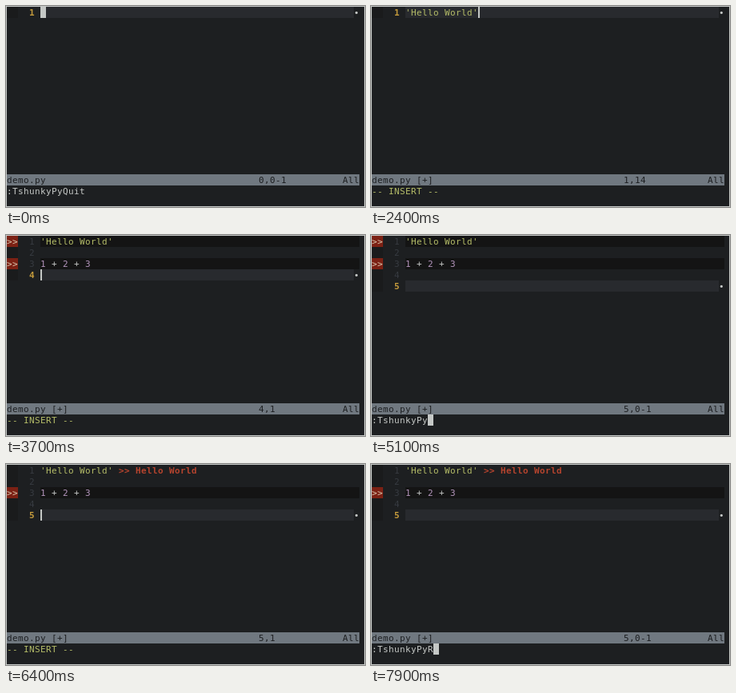
An HTML page with a canvas for the animation above (8000 ms loop, 449 by 252 pixels).

```html
<!DOCTYPE html>
<html lang="en">
<head>
<meta charset="utf-8">
<title>Editor session</title>
<style>
  html, body { margin: 0; width: 100%; height: 100%; overflow: hidden; background: #1d1f21; }
  canvas { display: block; }
</style>
</head>
<body>
<canvas id="screen" width="449" height="252"></canvas>
<script>
const ctx = document.getElementById('screen').getContext('2d');

const LOOP = 8000;
const CELL_W = 7, CELL_H = 14, ORIGIN = 1, BASELINE = 11;
const COLS = 63, TEXT_COL = 6, STATUS_ROW = 15, CMD_ROW = 16;
const FONT = '11px "DejaVu Sans Mono", monospace';

const C = {
  bg: '#1d1f21', fg: '#c5c8c6', border: '#c5c8c6', sign: '#1a1b1c',
  cursorLine: '#282a2e', stale: '#141414', status: '#707880',
  lineNr: '#373b41', currentNr: '#c39a3c', string: '#b5bd68',
  number: '#b294bb', result: '#b5442e', errorBg: '#7c2114', errorFg: '#dcc9b0'
};

const HELLO = "'Hello World'";
const FIRST = HELLO + '\n\n';
const SECOND = '1 + 2 + 3\n\n';
const COMMAND = ':TshunkyPyRunFirstStalled';

const colX = col => ORIGIN + col * CELL_W;
const rowY = row => ORIGIN + row * CELL_H;

function fill(col, row, cols, color) {
  ctx.fillStyle = color;
  ctx.fillRect(colX(col), rowY(row), cols * CELL_W, CELL_H);
}

// One glyph per terminal cell
function print(text, col, row, color, bold) {
  ctx.font = (bold ? 'bold ' : '') + FONT;
  ctx.fillStyle = color;
  [...text].forEach((ch, i) => {
    if (ch !== ' ') ctx.fillText(ch, colX(col + i), rowY(row) + BASELINE);
  });
}

// Keys pressed so far at a steady typing pace
const keys = (t, start, pace) => Math.max(0, Math.floor((t - start) / pace));

function startMessage(t) {
  if (t < 100) return ':TshunkyPyQuit';
  if (t < 200) return '';
  if (t < 300) return ':TshunkyPy';
  return 'TshunkyPy is ready.';
}

function stateAt(t) {
  const text = FIRST.slice(0, keys(t, 1300, 80)) + SECOND.slice(0, keys(t, 3020, 68));
  const state = { lines: text.split('\n'), mode: 'insert', message: '', done: t >= 6300 };
  if (t < 1300) {
    state.mode = 'normal';
    state.message = startMessage(t);
  } else if (t >= 4400 && t < 6300) {
    state.mode = 'command';
    state.message = COMMAND.slice(0, keys(t, 4320, 76));
  } else if (t >= 6300 && t < 6400) {
    state.mode = 'normal';
    state.message = COMMAND;
  } else if (t >= 7000) {
    const n = keys(t, 7000, 76);
    state.mode = n ? 'command' : 'normal';
    state.message = COMMAND.slice(0, n);
  }
  return state;
}

function drawCode(line, row) {
  if (line[0] === "'") return print(line, TEXT_COL, row, C.string);
  [...line].forEach((ch, i) =>
    print(ch, TEXT_COL + i, row, /\d/.test(ch) ? C.number : C.fg));
}

function drawLine(line, row, current, done) {
  const evaluated = done && row === 0;
  const stale = line && !current && !evaluated;
  fill(0, row, 2, stale ? C.errorBg : C.sign);
  if (stale) {
    print('>>', 0, row, C.errorFg);
    fill(TEXT_COL, row, COLS - TEXT_COL, C.stale);
  }
  if (current) {
    fill(TEXT_COL, row, COLS - TEXT_COL - 1, C.cursorLine);
    print('•', COLS - 1, row, C.fg);
  }
  print(String(row + 1), 4, row, current ? C.currentNr : C.lineNr, current);
  drawCode(line, row);
  if (evaluated) print('>> Hello World', TEXT_COL + line.length + 1, row, C.result, true);
}

function drawStatus(lines, mode) {
  const last = lines[lines.length - 1];
  const empty = lines.length === 1 && !last;
  const column = mode === 'insert' ? last.length + 1 : '0-1';
  fill(0, STATUS_ROW, COLS, C.status);
  print('demo.py' + (empty ? '' : ' [+]'), 0, STATUS_ROW, C.bg);
  print(`${empty ? 0 : lines.length},${column}`, 45, STATUS_ROW, C.bg);
  print('All', 60, STATUS_ROW, C.bg);
}

function drawCursor(lines, mode, message) {
  const row = lines.length - 1;
  const col = TEXT_COL + lines[row].length;
  if (mode === 'command') fill(message.length, CMD_ROW, 1, C.fg);
  else if (mode === 'normal') fill(col, row, 1, C.fg);
  else {
    ctx.fillStyle = C.fg;
    ctx.fillRect(colX(col), rowY(row), 2, CELL_H);
  }
}

function draw(t) {
  const { lines, mode, message, done } = stateAt(t);
  ctx.fillStyle = C.border;
  ctx.fillRect(0, 0, 449, 252);
  ctx.fillStyle = C.bg;
  ctx.fillRect(1, 1, 447, 250);

  lines.forEach((line, row) => drawLine(line, row, row === lines.length - 1, done));
  drawStatus(lines, mode);
  if (mode === 'insert') print('-- INSERT --', 0, CMD_ROW, C.string);
  else print(message, 0, CMD_ROW, C.fg);
  drawCursor(lines, mode, message);
}

// The picture advances in steps of 100 ms
function tick() {
  draw(Math.floor((performance.now() % LOOP) / 100) * 100);
  requestAnimationFrame(tick);
}
tick();
</script>
</body>
</html>
```
